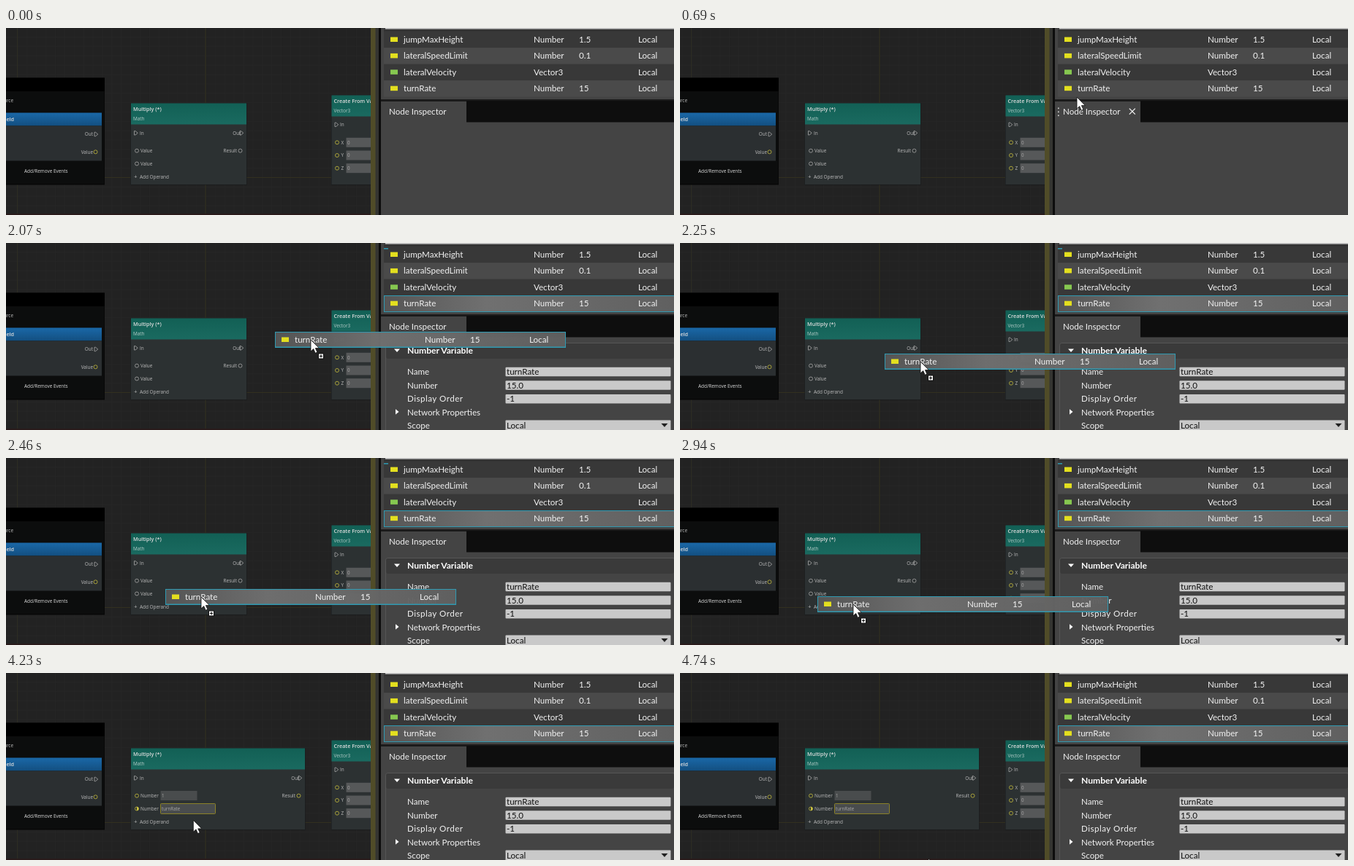
These frames come from a looping animation (914x257 px, 4.77 s). An HTML page:

```html
<!DOCTYPE html>
<html lang="en">
<head>
<meta charset="utf-8">
<title>Drag a variable onto a node</title>
<style>
html, body { margin: 0; width: 100%; height: 100%; overflow: hidden; background: #222; }
svg { display: block; width: 100%; height: 100%; }
text { white-space: pre; }
.ui { font: 11.6px Lato, sans-serif; fill: #f2f2f2; }
.head { font: bold 12.1px Lato, sans-serif; fill: #fff; }
.field { font: 11.6px Lato, sans-serif; fill: #111; }
.node { font: 6.4px "Open Sans", sans-serif; fill: #bcbcbc; }
.title { font: 600 7.2px "Open Sans", sans-serif; fill: #dcdcdc; }
.sub { font: 6.4px "Open Sans", sans-serif; fill: #b4cbc7; }
.dim { font: 6.2px "Open Sans", sans-serif; fill: #aaa; }
</style>
</head>
<body>
<svg id="stage" viewBox="0 0 914 257" preserveAspectRatio="none"></svg>
<script>
const LOOP = 4770, STEP = 30;
const stage = document.getElementById('stage');

const rect = (x, y, w, h, fill, more = '') =>
  `<rect x="${x}" y="${y}" width="${w}" height="${h}" fill="${fill}" ${more}/>`;
const text = (x, y, s, cls = 'ui', more = '') =>
  `<text x="${x}" y="${y}" class="${cls}" ${more}>${s}</text>`;
const path = (d, stroke, more = '') =>
  `<path d="${d}" fill="none" stroke="${stroke}" ${more}/>`;
const ring = (x, y, color = '#999') =>
  `<circle cx="${x}" cy="${y}" r="2.5" fill="none" stroke="${color}" stroke-width=".9"/>`;
const flow = (x, y) => path(`M${x} ${y - 2.7}h1.5l3.3 2.7l-3.3 2.7h-1.5z`, '#aaa', 'stroke-width=".8"');
const group = (id, body, more = '') => `<g id="${id}" ${more}>${body}</g>`;
const END = 'text-anchor="end"';

function grid() {
  let s = rect(0, 0, 500, 257, '#222');
  for (let x = 2.8; x < 500; x += 12.87) s += rect(x, 0, 1, 257, '#262626');
  for (let y = 12; y < 257; y += 12.87) s += rect(0, y, 500, 1, '#262626');
  s += rect(15, 0, 1, 257, '#2d2c23') + rect(272.5, 0, 1, 257, '#32301f');
  return s + rect(0, 205, 500, 1, '#32301f') + rect(0, 255, 500, 2, '#291b1b');
}

function eventNode() {
  return rect(0, 68.5, 135, 147, '#070707') + rect(0, 87, 134, 127, '#0c0d0d') +
    rect(0, 68.5, 135, 18.5, '#000') +
    text(10, 101.5, 'Source', 'node', END) +
    rect(0, 116.5, 131, 18, 'url(#blue)') +
    text(11, 128, 'Field', 'title', END) +
    rect(0, 134.5, 131, 48, '#2b2f31') +
    text(119, 148.3, 'Out', 'node', END) + flow(121, 146) +
    text(119, 172.6, 'Value', 'node', END) + ring(122.5, 170.3, '#b5ad3c') +
    text(25, 199, 'Add/Remove Events', 'node', 'style="fill:#ddd"');
}

function nodeBox(x, y, w, h, head) {
  return rect(x - .5, y - .5, w + 1, h + 1, '#171b1c') +
    rect(x, y, w, h, '#2c3132') + rect(x, y, w, head, 'url(#teal)');
}

function multiplyNode(wide) {
  const w = wide ? 238 : 158, r = 171 + w;
  let s = nodeBox(171, 103.5, w, 111.5, 29) +
    text(174, 114.3, 'Multiply (*)', 'title') + text(174, 127, 'Math', 'sub') +
    flow(175.5, 144.3) + text(183, 146.7, 'In', 'node') +
    text(r - 7.5, 146.7, 'Out', 'node', END) + flow(r - 9 + 2, 144.3).replace('stroke=', 'transform="translate(-2 0)" stroke=') +
    text(r - 13, 171, 'Result', 'node', END) + ring(r - 8.5, 168.7, wide ? '#b5ad3c' : '#999') +
    text(175, 206.5, '+', 'node', 'style="font-size:8px"') + text(183, 206.5, 'Add Operand', 'node');
  if (wide) {
    s += ring(179, 168.7, '#b5ad3c') + ring(179, 186.5, '#b5ad3c') +
      '<path d="M179 184a2.5 2.5 0 0 1 0 5z" fill="#c9c040"/>' +
      text(184, 171, 'Number', 'node') + text(184, 189, 'Number', 'node') +
      rect(211.5, 162, 50, 13, '#494c4d') + text(213, 171, '1', 'dim') +
      rect(211.5, 179.5, 75, 14, '#494c4d', 'stroke="#8b8127" rx="1"') +
      text(213, 189, 'turnRate', 'dim');
  } else {
    s += ring(179, 168.7) + text(184, 171, 'Value', 'node') +
      group('slotRing', ring(179, 186.5)) + group('slotRingHot', ring(179, 186.5, '#77712f')) +
      text(184, 189, 'Value', 'node', 'id="slotText"');
  }
  return s;
}

function vectorNode() {
  let s = nodeBox(445.5, 92.5, 70, 122.5, 29) +
    text(448.5, 103.3, 'Create From Values', 'title') + text(448.5, 116, 'Vector3', 'sub') +
    flow(450, 132.8) + text(457, 135.2, 'In', 'node');
  ['X', 'Y', 'Z'].forEach((c, i) => {
    const y = 157.3 + i * 17.7;
    s += ring(453, y, '#b5ad3c') + text(458.5, y + 2.3, c, 'node') +
      rect(465.5, y - 6.5, 40, 13, '#565859') + text(467, y + 2.4, '0', 'dim');
  });
  return s;
}

function rowText(x, y, name, type, value, color) {
  return rect(x + 9, y - 3.5, 10, 6.5, color) + text(x + 27, y + 4, name) +
    text(x + 205, y + 4, type) + text(x + 267, y + 4, value) + text(x + 348, y + 4, 'Local');
}

function table() {
  const rows = [
    ['jumpMaxHeight', 'Number', '1.5', '#e3df1f'],
    ['lateralSpeedLimit', 'Number', '0.1', '#e3df1f'],
    ['lateralVelocity', 'Vector3', '', '#86c850'],
    ['turnRate', 'Number', '15', '#e3df1f']
  ];
  let s = rect(499, 0, 7, 257, '#504c28') + rect(505.5, 0, 5, 257, '#343431') +
    rect(510, 0, 3, 257, '#0d0d0d') + rect(513, 0, 401, 257, '#444') +
    rect(519, 0, 395, 1.5, '#c8c8c8') + rect(517, 2, 397, 3, '#333');
  rows.forEach((r, i) => {
    const y = 16 + i * 22.4;
    s += rect(517, y - 11.2, 397, 22.4, i % 2 ? '#4a4a4a' : '#383838');
    if (i === 3) s += group('picked', rect(517.5, 72.5, 399, 22, 'url(#pick)', 'stroke="#2f9ab2"'));
    s += rowText(517, y, ...r);
  });
  return s + rect(513, 98, 401, 3, '#1b1b1b') + rect(630, 100, 284, 29.5, '#0e0e0e') +
    text(524, 118.6, 'Node Inspector') +
    group('tabHover', [109.5, 114.5, 119.5].map(y => rect(517, y, 1.6, 1.6, '#ddd')).join('') +
      path('M614.8 110.6l8 8m0-8l-8 8', '#f2f2f2', 'stroke-width="1.3"'));
}

const field = (y, s, h = 12.5) =>
  rect(683.5, y - h / 2, 226, h, '#c9c9c9', 'rx="1"') + text(685, y + 4, s, 'field');

function inspector() {
  return rect(519.5, 137.5, 400, 130, '#444', 'rx="3" stroke="#565656"') +
    rect(520, 138, 394, 21, '#3a3a3a', 'rx="3"') +
    '<path d="M531 145.5h8l-4 4.5z" fill="#fff"/>' + text(549, 152.2, 'Number Variable', 'head') +
    text(549, 181, 'Name') + field(177, 'turnRate') +
    text(549, 199.8, 'Number') + field(195.5, '15.0') +
    text(549, 218.4, 'Display Order', 'ui', 'letter-spacing=".5"') + field(214.3, '-1') +
    '<path d="M533 228.3v7.4l4.5-3.7z" fill="#fff"/>' + text(549, 236.8, 'Network Properties') +
    text(549, 255, 'Scope') + field(250.5, 'Local', 14) +
    '<path d="M896.5 248h9l-4.5 5z" fill="#222"/>';
}

const arrow = '<path d="M0 0v16l3.7-3.4l2.5 5.7l2.7-1.2l-2.5-5.5h5z" fill="#fff" stroke="#111" stroke-width=".8"/>';
const plus = rect(10.5, 19, 7, 7, '#fff', 'stroke="#111"') + path('M14 20.4v4.2m-2.1-2.1h4.2', '#111', 'stroke-width="1.2"');

const ramp = (id, a, b, dir) =>
  `<linearGradient id="${id}" ${dir}><stop stop-color="${a}"/><stop offset="1" stop-color="${b}"/></linearGradient>`;
const down = 'x1="0" y1="0" x2="0" y2="1"';

stage.innerHTML =
  '<defs>' + ramp('teal', '#126055', '#1a6a60', down) + ramp('blue', '#1a68a8', '#134f80', down) +
  '<linearGradient id="pick"><stop stop-color="#565656"/><stop offset=".35" stop-color="#707070"/><stop offset="1" stop-color="#606060"/></linearGradient>' +
  '<clipPath id="left"><rect width="499.5" height="257"/></clipPath></defs>' +
  group('graph', grid() + eventNode() + vectorNode() + group('narrow', multiplyNode(false)) +
    group('wide', multiplyNode(true)), 'clip-path="url(#left)"') +
  table() +
  group('partial', field(193.3, '15.0', 13) + field(210.3, '-1', 13)) +
  group('inspect', inspector()) +
  group('mark', rect(517, 7, 6, 1.5, '#2f9ab2')) +
  group('ghost', rect(.5, .5, 397, 21, 'url(#pick)', 'stroke="#2f9ab2" fill-opacity=".97"') +
    rect(0, 20.5, 398, 1.5, '#2f9ab2') + rowText(0, 11, 'turnRate', 'Number', '15', '#e3df1f')) +
  group('cursor', arrow + group('plus', plus));

const $ = id => document.getElementById(id);
const show = (id, on) => { $(id).style.display = on ? '' : 'none'; };
const move = (id, x, y) => $(id).setAttribute('transform', `translate(${x.toFixed(1)} ${y.toFixed(1)})`);

// pointer track: time, x, y
const track = [
  [240, 345, 257], [390, 430, 214], [510, 500, 162], [600, 530, 122], [690, 543, 95],
  [780, 544, 94], [930, 557, 86], [1140, 566, 82], [1740, 566, 82],
  [1860, 530, 93], [1980, 468, 116], [2070, 417, 133], [2160, 362, 148],
  [2280, 318, 168], [2460, 267, 191], [2580, 243, 199], [2700, 232, 200],
  [2850, 232, 200], [2940, 237, 201], [3120, 232, 201], [3300, 232, 201],
  [3330, 230, 201], [4080, 230, 201], [4320, 272, 203], [4590, 322, 216], [4740, 340, 255]
];

function pointer(t) {
  const i = track.findIndex(k => k[0] > t);
  if (i < 0) return track[track.length - 1].slice(1);
  const b = track[i], a = track[i - 1] || b;
  const u = a === b ? 0 : (t - a[0]) / (b[0] - a[0]);
  return [a[1] + (b[1] - a[1]) * u, a[2] + (b[2] - a[2]) * u];
}

function draw(ms) {
  const t = Math.floor((ms % LOOP) / STEP) * STEP;
  const [x, y] = pointer(t);
  const drag = t >= 1800 && t < 3750;
  const done = t >= 3810;
  show('cursor', t >= 240);
  move('cursor', x, y);
  show('plus', drag);
  show('ghost', drag);
  show('mark', drag);
  move('ghost', x - 49, y - 11);
  show('tabHover', t >= 600 && t < 780);
  show('picked', t >= 1650);
  show('partial', t >= 1650 && t < 1680);
  show('inspect', t >= 1680);
  show('narrow', !done);
  show('wide', done);
  show('slotRing', t < 3720);
  show('slotRingHot', t >= 3720);
  $('slotText').style.fill = t >= 3300 ? '#77712f' : '';
}

const start = performance.now();
function tick() {
  draw(performance.now() - start);
  requestAnimationFrame(tick);
}
tick();
</script>
</body>
</html>
```
